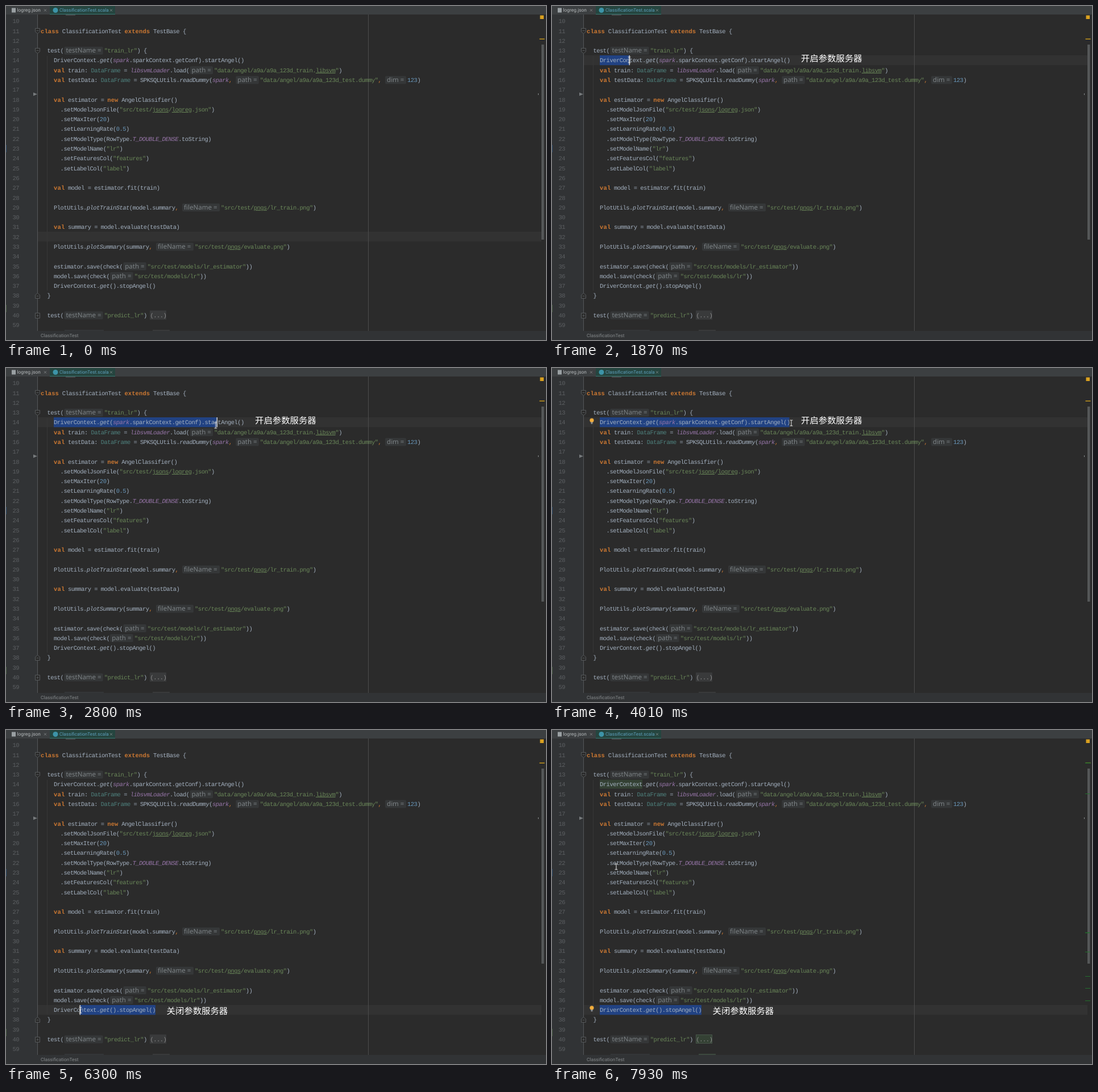
An HTML page for the animation above (8 s loop, 950 by 589 pixels).

```html
<!DOCTYPE html>
<html lang="zh">
<head>
<meta charset="utf-8">
<title>ClassificationTest.scala</title>
<style>
html, body { margin: 0; width: 100%; height: 100%; overflow: hidden; background: #2b2b2b; }
svg { display: block; width: 950px; height: 589px; }
text { white-space: pre; text-rendering: geometricPrecision; }
.code text { font: 10.5px "Liberation Mono", "DejaVu Sans Mono", monospace; letter-spacing: -.53px; fill: #a3b0bf; }
.code .k { font-weight: bold; letter-spacing: .1px; fill: #cc7832; }
.code .t { fill: #4e807d; }
.code .p { font-style: italic; fill: #9876aa; }
.code .m { font-style: italic; }
.code .s, .code .u { fill: #6a8759; }
.code .u { text-decoration: underline; text-underline-offset: 1.5px; text-decoration-thickness: 1px; }
.code .n { fill: #6897bb; }
.code .o { fill: #cc7832; }
.code .f { fill: #8c8c8c; }
.code .num { fill: #5c5f62; }
.code .h { font: 11.5px "Noto Sans", "Open Sans", sans-serif; letter-spacing: 0; fill: #7d8386; }
.code .b { font-weight: bold; fill: #ffef28; }
.ui { font: 8.4px Roboto, "Noto Sans", sans-serif; fill: #b4b8ba; }
.ui .active { font-size: 8.2px; fill: #5f9fbd; }
.label { font: 300 15.4px "Noto Sans CJK SC", "Noto Sans CJK", sans-serif; fill: #fff; }
.sel { fill: #214283; }
.fold { fill: #2b2b2b; stroke: #55585a; }
</style>
</head>
<body>
<svg viewBox="0 0 950 589">
  <rect width="950" height="589" fill="#2b2b2b"/>
  <rect width="55" height="589" fill="#313335"/>
  <rect y="245" width="1" height="13" fill="#2f4f6f"/>
  <rect y="527" width="1" height="13" fill="#4b5f45"/>
  <rect id="row" x="56" width="886" height="17.3" fill="#323232"/>
  <rect x="55" y="15" width="1" height="558" fill="#555759"/>
  <rect x="72" y="88" width="1" height="414" fill="#373737"/>
  <rect x="637" y="15" width="1" height="558" fill="#4b4b4b"/>
  <g id="icons"></g>
  <path d="M48 152.500l7 3l-7 3z" fill="#777b7d"/>
  <rect x="936" y="154" width="1" height="3" fill="#8a8d8f"/>
  <rect x="105" y="15" width="17" height="2" fill="#45484a"/>

  <rect id="selA" class="sel" x="84" height="17.3"/>
  <rect id="selB" class="sel" x="61" height="17.3"/>
  <rect id="selC" class="sel" height="17.3"/>
  <rect id="usage" x="84" width="75" height="16" fill="#344134"/>
  <rect id="pair" x="252" width="11.500" height="16.500" fill="#3b514d"/>

  <rect x="103" y="571" width="69" height="2" fill="#343638"/>
  <rect x="253" y="537" width="29" height="16" fill="#393a3b"/>
  <rect x="258" y="571" width="30" height="2" fill="#393a3b"/>
  <g id="folds" fill="#344134">
    <rect x="253.500" y="537.500" width="28" height="15" stroke="#48564a"/>
    <rect x="258" y="571" width="30" height="2" fill="#3d4a3f"/>
  </g>
  <g id="code" class="code"></g>
  <g id="braces" class="code"></g>

  <rect x="942" y="68" width="4.500" height="344" fill="#555758"/>
  <rect x="939.500" y="16.500" width="6.500" height="6.500" fill="#d9a020"/>
  <rect x="938.500" y="57.500" width="9" height="1.500" fill="#c4961c"/>
  <path id="marks" d="M938 112.500h9M938 391.500h9M938 434.500h9M938 455.500h9M938 477.500h9" stroke="#22702c"/>
  <path id="marks2" d="M938 58.200h9.500M938 357.500h9" stroke="#22702c" stroke-width="1.500"/>

  <rect width="950" height="15" fill="#3c3f41"/>
  <rect x="77" width="115" height="15" fill="#25453f"/>
  <rect x="77" y="14" width="115" height="1" fill="#3a7a74"/>
  <rect x="10" y="3.500" width="7" height="8" fill="#9aa0a3"/>
  <circle cx="87" cy="7.500" r="4.500" fill="#3d94a8"/>
  <g class="ui">
    <text x="19.500" y="10.300">logreg.json</text>
    <text class="active" x="94" y="10.300">ClassificationTest.scala</text>
  </g>
  <path d="M67 5.500l4 4m0 -4l-4 4M183 5.500l4 4m0 -4l-4 4" stroke="#8a8e90" stroke-width=".8"/>
  <rect y="573" width="950" height="16" fill="#313335"/>
  <text class="ui" x="61" y="583.800" style="fill:#85898b">ClassificationTest</text>

  <rect id="caret" x="-.5" width="1.600" height="17.300" fill="#d0d0d0"/>
  <text id="labelA" class="label" x="438" y="97.700">开启参数服务器</text>
  <text id="labelB" class="label" x="282.500" y="500.700">关闭参数服务器</text>
  <g id="bulb">
    <circle cx="70" cy="-4" r="3.600" fill="#f2ad3c"/>
    <path d="M68.200 0h3.600M68.700 1.800h2.600" stroke="#c9cdd0"/>
  </g>
  <path id="mouse" d="M-2.500 -5H-.8L0 -4.300L.8 -5H2.500M0 -4.300V4.300M-2.500 5H-.8L0 4.300L.8 5H2.500" fill="none" stroke="#dcdcdc" stroke-width="1.100"/>
</svg>
<script>
const LOOP = 8000, CHAR = 5.77, BOLD = 6.4, PITCH = 17.29;
const HINTS = { testName: 71.3, path: 43.5, fileName: 69, dim: 40 };
const $ = id => document.getElementById(id);
const mid = line => 27 + (line - 10) * PITCH;
const rowTop = line => Math.round(mid(line) - 9.2);
const baseline = line => mid(line) + 3.3;

function add(parent, tag, attrs, text = '') {
  const el = document.createElementNS('http://www.w3.org/2000/svg', tag);
  for (const key in attrs) el.setAttribute(key, attrs[key]);
  el.textContent = text;
  parent.appendChild(el);
}

// line number, indent, then runs that each start with a style letter
const lines = [
  [11, 0, 'kclass|d ClassificationTest |kextends|d TestBase {'],
  [13, 2, 'dtest(|htestName|s"train_lr"|d) {'],
  [14, 4, 'dDriverContext.|mget|d(|pspark|d.sparkContext.getConf).startAngel()'],
  [15, 4, 'kval|d train: |tDataFrame|d = |plibsvmLoader|d.load(|hpath|s"data/angel/a9a/a9a_123d_train.|ulibsvm|s"|d)'],
  [16, 4, 'kval|d testData: |tDataFrame|d = SPKSQLUtils.|mreadDummy|d(|pspark|o, |hpath|s"data/angel/a9a/a9a_123d_test.dummy"|o, |hdim|n123|d)'],
  [18, 4, 'kval|d estimator = |knew|d AngelClassifier()'],
  [19, 6, 'd.setModelJsonFile(|s"src/test/|ujsons|s/|ulogreg|s.json"|d)'],
  [20, 6, 'd.setMaxIter(|n20|d)'],
  [21, 6, 'd.setLearningRate(|n0.5|d)'],
  [22, 6, 'd.setModelType(RowType.|pT_DOUBLE_DENSE|d.toString)'],
  [23, 6, 'd.setModelName(|s"lr"|d)'],
  [24, 6, 'd.setFeaturesCol(|s"features"|d)'],
  [25, 6, 'd.setLabelCol(|s"label"|d)'],
  [27, 4, 'kval|d model = estimator.fit(train)'],
  [29, 4, 'dPlotUtils.|mplotTrainStat|d(model.summary|o, |hfileName|s"src/test/|upngs|s/lr_train.png"|d)'],
  [31, 4, 'kval|d summary = model.evaluate(testData)'],
  [33, 4, 'dPlotUtils.|mplotSummary|d(summary|o, |hfileName|s"src/test/|upngs|s/evaluate.png"|d)'],
  [35, 4, 'destimator.save(check(|hpath|s"src/test/models/lr_estimator"|d))'],
  [36, 4, 'dmodel.save(check(|hpath|s"src/test/models/lr"|d))'],
  [37, 4, 'dDriverContext.|mget|d().stopAngel()'],
  [38, 2, 'd}'],
  [40, 2, 'dtest(|htestName|s"predict_lr"|d) |f(...)'],
];

for (const [line, indent, runs] of lines) {
  let x = 61 + indent * CHAR;
  const y = baseline(line);
  for (const run of runs.split('|')) {
    const kind = run[0], text = run.slice(1);
    if (kind === 'h') {
      add($('code'), 'rect', { x: x + 1, y: y - 10.5, width: HINTS[text] - 3, height: 14, rx: 2, fill: '#353738' });
      add($('code'), 'text', { class: 'h', x: x + 4, y }, text + ' =');
      x += HINTS[text];
    } else {
      add($('code'), 'text', { class: kind, x, y }, text);
      x += text.length * (kind === 'k' ? BOLD : CHAR);
    }
  }
}
for (let line = 10; line <= 41; line++)
  add($('code'), 'text', { class: 'num', x: 11.5, y: baseline(line) }, line > 40 ? 59 : line);
add($('braces'), 'text', { class: 'b', x: 251.5, y: baseline(37) }, '()');

const foldIcon = (line, outline, sign) =>
  add($('icons'), 'path', { class: 'fold', d: `M51.5 ${Math.round(mid(line)) - 4.5}${outline}${sign}` });
foldIcon(11, 'h8v6l-4 3l-4 -3z', 'm2 4h4');
foldIcon(13, 'h8v6l-4 3l-4 -3z', 'm2 4h4');
foldIcon(38, 'm0 3l4 -3l4 3v6h-8z', 'm2 2h4');
foldIcon(40, 'h8v9h-8z', 'm2 4.5h4m-2 -2v4');

$('selA').setAttribute('y', rowTop(14));
$('selB').setAttribute('y', rowTop(15));
$('selC').setAttribute('y', rowTop(37));
$('usage').setAttribute('y', rowTop(14) + .5);
$('pair').setAttribute('y', rowTop(37) + .5);

// keys: [ms, css, steps until the next key]; without steps the value holds
const sheet = document.createElement('style');
function track(id, keys) {
  const body = keys.map(([ms, css, n]) =>
    `${ms / LOOP * 100}% { ${css}; animation-timing-function: ${n ? `steps(${n})` : 'step-end'} }`);
  const last = keys[keys.length - 1][1];
  sheet.textContent += `@keyframes ${id} { ${body.join(' ')} 100% { ${last} } }
    #${id} { animation: ${id} ${LOOP}ms infinite }\n`;
}
const at = (x, y, alpha = 1) => `transform: translate(${x}px, ${y}px); opacity: ${alpha}`;
const wide = w => `width: ${w}px`;
const span = (from, to = 262.9) => `x: ${from}px; width: ${to - from}px`;
const show = (id, ...spans) => track(id, [[0, 'opacity: 0'],
  ...spans.flatMap(([from, to]) => to ? [[from, 'opacity: 1'], [to, 'opacity: 0']] : [[from, 'opacity: 1']])]);

track('mouse', [
  [0, at(680, 464, 0)], [610, at(680, 464), 3], [835, at(330, 250), 3], [1060, at(99, 92)],
  [1137, at(99, 92), 4], [1430, at(84, 95)],
  [1578, at(84, 95), 4], [1870, at(136, 95), 8], [2460, at(334, 104), 10], [3190, at(421, 97)],
  [4477, at(421, 97), 11], [5280, at(269, 503)], [5360, at(273, 499)],
  [5575, at(273, 499), 10], [6300, at(131, 494), 10], [7070, at(84, 495)],
  [7510, at(84, 495), 6], [7930, at(113, 241)],
]);
track('row', [
  [0, at(0, rowTop(32))], [1650, at(0, rowTop(14))], [2312, at(0, rowTop(15))],
  [2533, at(0, rowTop(14))], [5500, at(0, rowTop(37))],
]);
track('selA', [
  [0, wide(0)], [1578, wide(0), 4], [1870, wide(52), 6], [2312, wide(858)],
  [2533, wide(259), 8], [3117, wide(333.5)], [5500, wide(0)],
]);
track('selB', [[0, wide(0)], [2312, wide(223), 2], [2460, wide(261)], [2533, wide(0)]]);
track('selC', [
  [0, span(262.9)], [5648, span(258.8), 9], [6300, span(130), 10], [7070, span(84)],
]);
track('caret', [
  [0, at(84, rowTop(14), 0)], [1650, at(97, rowTop(14)), 3], [1870, at(136, rowTop(14)), 6],
  [2312, at(284, rowTop(15)), 2], [2460, at(322, rowTop(15))],
  [2533, at(343, rowTop(14)), 8], [3117, at(417.6, rowTop(14))],
  [4010, at(417.6, rowTop(14), 0)], [4550, at(417.6, rowTop(14))], [5060, at(417.6, rowTop(14), 0)],
  [5500, at(263.5, rowTop(37))], [5648, at(258.8, rowTop(37)), 9], [6300, at(130, rowTop(37)), 10],
  [7070, at(84, rowTop(37))], [7580, at(84, rowTop(37), 0)],
]);
track('bulb', [
  [0, at(0, mid(14), 0)], [3630, at(0, mid(14))], [5500, at(0, mid(14), 0)], [7580, at(0, mid(37))],
]);
show('labelA', [1800, 5500]);
show('labelB', [5860]);
show('pair', [5500, 5648]);
show('braces', [5500, 5648]);
show('marks', [2312, 2680], [7070]);
show('folds', [2312, 2680], [7070]);
show('marks2', [7070]);
show('usage', [7070]);
document.head.appendChild(sheet);
</script>
</body>
</html>
```
